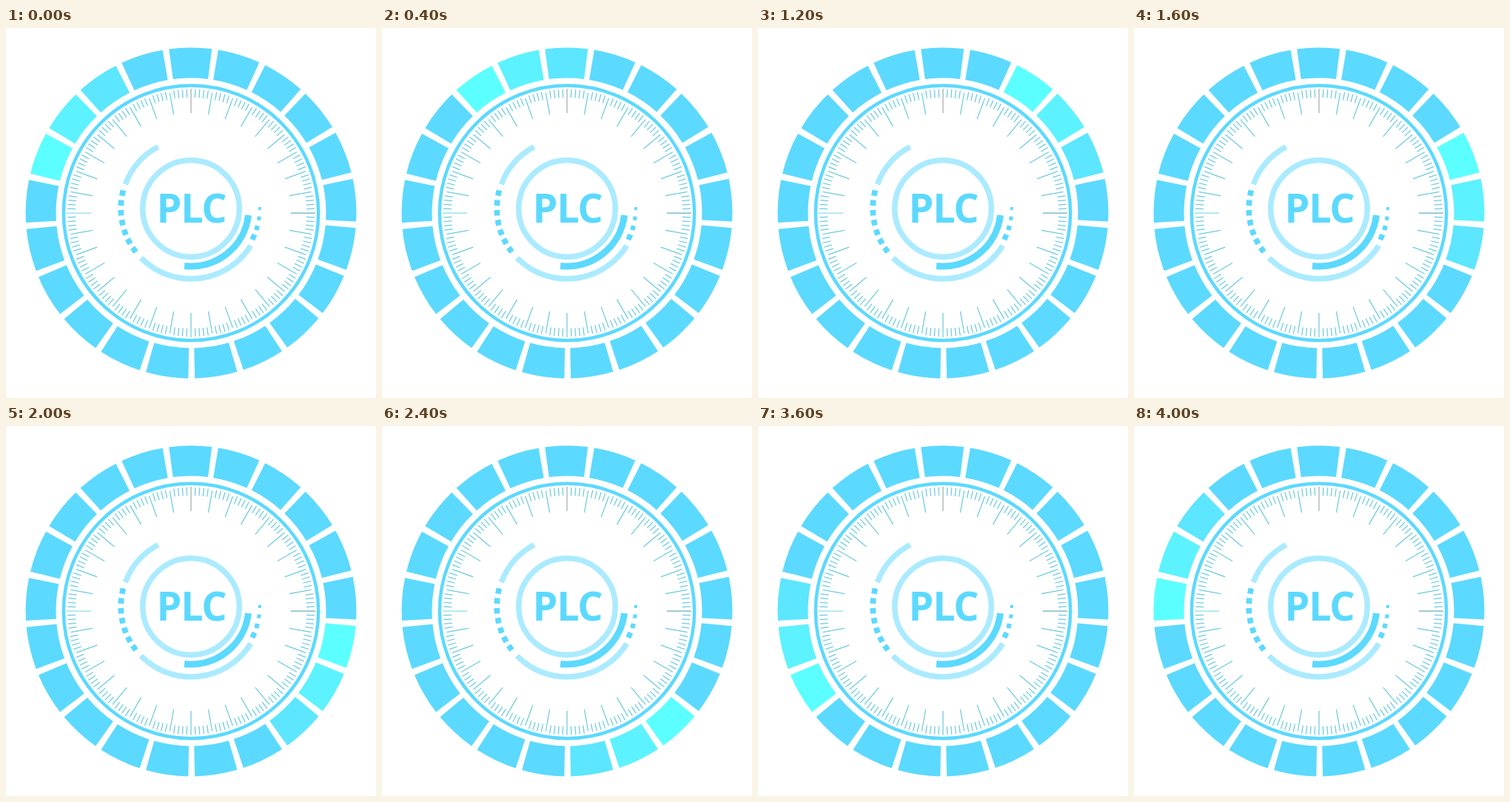
Recreate the animation shown at these times as an HTML page with a canvas. Size 500x500 px, loop 4.2 s.

```html
<!DOCTYPE html>
<html lang="en">
<head>
<meta charset="utf-8">
<title>PLC dial</title>
<style>
  html, body { margin: 0; width: 100%; height: 100%; overflow: hidden; background: #fff; }
  canvas { display: block; }
</style>
</head>
<body>
<canvas id="dial" width="500" height="500"></canvas>
<script>
const ctx = document.getElementById('dial').getContext('2d');
const BLUE = '#5cd9ff', PALE = '#abebff';
const GLOW = ['#5cffff', '#5cf2ff', '#5ce6ff'];
const COUNT = 21, STEP_MS = 200, FIRST = 17;

// Angles are in degrees, clockwise from twelve o'clock.
const rad = deg => (deg - 90) * Math.PI / 180;

function arc(cy, r, width, from, to, color) {
  ctx.beginPath();
  ctx.arc(250, cy, r, rad(from), rad(to));
  ctx.lineWidth = width;
  ctx.strokeStyle = color;
  ctx.stroke();
}

function dot(r, deg, size) {
  ctx.save();
  ctx.translate(250, 244);
  ctx.rotate(rad(deg));
  ctx.fillStyle = BLUE;
  ctx.fillRect(r - size / 2, -size / 2, size, size);
  ctx.restore();
}

function tick(deg) {
  const long = deg % 10 === 0;
  const inner = long ? 135 : 156, outer = deg % 90 === 0 ? 168 : long ? 165 : 167;
  const c = Math.cos(rad(deg)), s = Math.sin(rad(deg));
  ctx.beginPath();
  ctx.moveTo(250 + inner * c, 250 + inner * s);
  ctx.lineTo(250 + outer * c, 250 + outer * s);
  ctx.lineWidth = 1.25;
  ctx.strokeStyle = { 0: '#a3adb0', 90: '#62adbd', 270: '#86dcec' }[deg] || '#6ccbdf';
  ctx.stroke();
}

function segments(step) {
  const pitch = 360 / COUNT;
  for (let i = 0; i < COUNT; i++) {
    const ahead = (i - FIRST - step + 2 * COUNT) % COUNT;
    const mid = i * pitch - 0.2;
    arc(250, 203, 41, mid - 7.45, mid + 7.45, GLOW[ahead] || BLUE);
  }
}

function emblem() {
  arc(244, 65.3, 7.5, 0, 360, PALE);
  arc(244, 94.5, 7.5, 290.2, 332, PALE);
  arc(244, 95, 7.5, 121.8, 225.4, PALE);
  arc(244, 78, 9, 96.6, 186.6, BLUE);
  for (let i = 0; i < 7; i++) dot(94.8, 234 + 8.13 * i, 7.6);
  for (let i = 0; i < 4; i++) dot(92.8, 90 + 8.2 * i, 4 + 1.1 * i);
  ctx.font = '700 54px "Open Sans", "Noto Sans", sans-serif';
  ctx.letterSpacing = '-1.3px';
  ctx.fillStyle = BLUE;
  ctx.fillText('PLC', 203.6, 263);
}

function draw() {
  ctx.fillStyle = '#fff';
  ctx.fillRect(0, 0, 500, 500);
  segments(Math.floor(performance.now() / STEP_MS) % COUNT);
  arc(250, 172.2, 4.5, 0, 360, BLUE);
  for (let deg = 0; deg < 360; deg += 2) tick(deg);
  emblem();
  requestAnimationFrame(draw);
}
draw();
</script>
</body>
</html>
```
